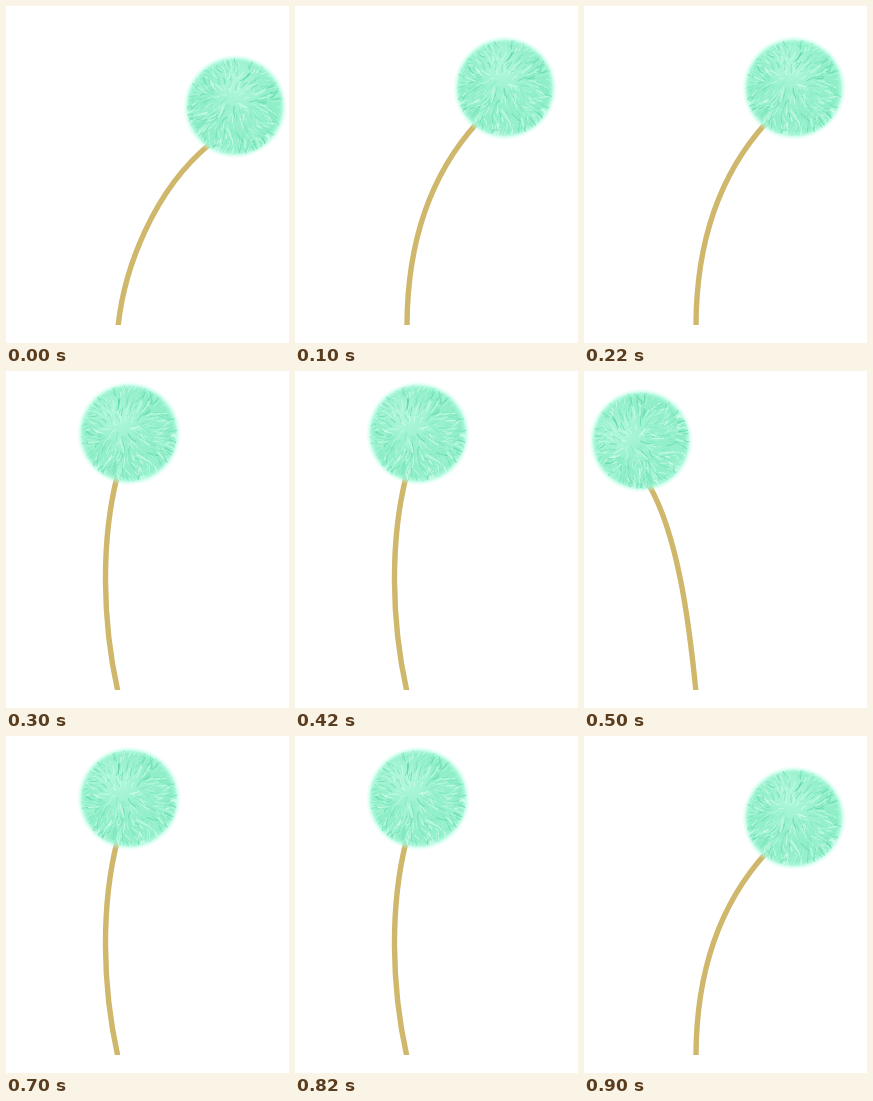
An HTML page with a canvas that plays this animation: 283x337 px, repeating every 1100 ms.

```html
<!DOCTYPE html>
<html lang="en">
<head>
<meta charset="utf-8">
<title>Swaying puff</title>
<style>
  html, body { margin: 0; width: 100%; height: 100%; overflow: hidden; background: #fff; }
  canvas { display: block; }
</style>
</head>
<body>
<canvas width="283" height="337"></canvas>
<script>
const ctx = document.querySelector('canvas').getContext('2d');
const LOOP = 1100, STEP = 200, TAU = Math.PI * 2;

// Head centre, tilt in degrees, and the stem's two control points and tip
const poses = [
  { head: [229, 100.5], tilt: 50, stem: [118, 262, 148, 184, 204, 138] },
  { head: [210, 82], tilt: 38, stem: [112, 240, 134, 170, 182, 117] },
  { head: [123, 62.5], tilt: 10, stem: [96, 250, 95, 170, 111, 106] },
  { head: [57, 69.5], tilt: -25, stem: [105, 250, 94, 165, 65, 114] }
];
const order = [0, 1, 2, 3, 2, 1];

let seed = 41;
function random() {
  seed = (seed * 16807) % 2147483647;
  return seed / 2147483647;
}

// Fur grows outward in waves from a whorl a little off the middle of the head
const whorl = [-9, -3];
const furColors = ['#58d6a2', '#74e2b6', '#cdfdea', '#a4f5d5', '#b4f9de', '#e2fff4'];
const fur = Array.from({ length: 420 }, (_, i) => {
  const r = 44 * Math.sqrt(random()), a = random() * TAU;
  const x = r * Math.cos(a), y = r * Math.sin(a);
  const wave = 0.45 * Math.sin(x / 6 + y / 9);
  const angle = Math.atan2(y - whorl[1], x - whorl[0]) + wave + (random() - 0.5) * 0.6;
  const length = Math.min(4 + random() * 8, 48 - r);
  const bend = (random() - 0.5) * 5;
  const dx = Math.cos(angle) * length, dy = Math.sin(angle) * length;
  return {
    x, y, dx, dy,
    cx: dx / 2 - Math.sin(angle) * bend,
    cy: dy / 2 + Math.cos(angle) * bend,
    width: 0.6 + random() * 0.6,
    color: furColors[i % furColors.length]
  };
});

function radial(x, y, radius, stops) {
  const g = ctx.createRadialGradient(x, y, 0, x, y, radius);
  stops.forEach(([at, color]) => g.addColorStop(at, color));
  return g;
}

function disc(radius, fill) {
  ctx.fillStyle = fill;
  ctx.beginPath();
  ctx.arc(0, 0, radius, 0, TAU);
  ctx.fill();
}

function drawStem(points) {
  ctx.save();
  ctx.beginPath();
  ctx.rect(0, 0, 283, 319);
  ctx.clip();
  ctx.strokeStyle = '#cfb76c';
  ctx.lineWidth = 5.4;
  ctx.beginPath();
  ctx.moveTo(112, 321);
  ctx.bezierCurveTo(...points);
  ctx.stroke();
  ctx.restore();
}

function drawHead([x, y], tilt) {
  ctx.save();
  ctx.translate(x, y);
  ctx.rotate(tilt * Math.PI / 180);
  disc(52, radial(0, 0, 52, [
    [0, '#98f1cd'], [0.84, '#8feec8'], [0.9, 'rgba(152,245,210,.85)'],
    [0.95, 'rgba(175,255,225,.4)'], [1, 'rgba(190,255,230,0)']
  ]));
  disc(44, radial(-15, -16, 32, [[0, 'rgba(205,255,238,.5)'], [1, 'rgba(205,255,238,0)']]));
  ctx.lineCap = 'round';
  ctx.globalAlpha = 0.65;
  for (const f of fur) {
    ctx.strokeStyle = f.color;
    ctx.lineWidth = f.width;
    ctx.beginPath();
    ctx.moveTo(f.x, f.y);
    ctx.quadraticCurveTo(f.x + f.cx, f.y + f.cy, f.x + f.dx, f.y + f.dy);
    ctx.stroke();
  }
  ctx.restore();
}

// Poses are held; the first one is shown for half a step at the loop's start
function frame() {
  const t = performance.now() % LOOP;
  const pose = poses[order[Math.floor((t + STEP / 2) / STEP)]];
  ctx.clearRect(0, 0, 283, 337);
  drawStem(pose.stem);
  drawHead(pose.head, pose.tilt);
  requestAnimationFrame(frame);
}
frame();
</script>
</body>
</html>
```
